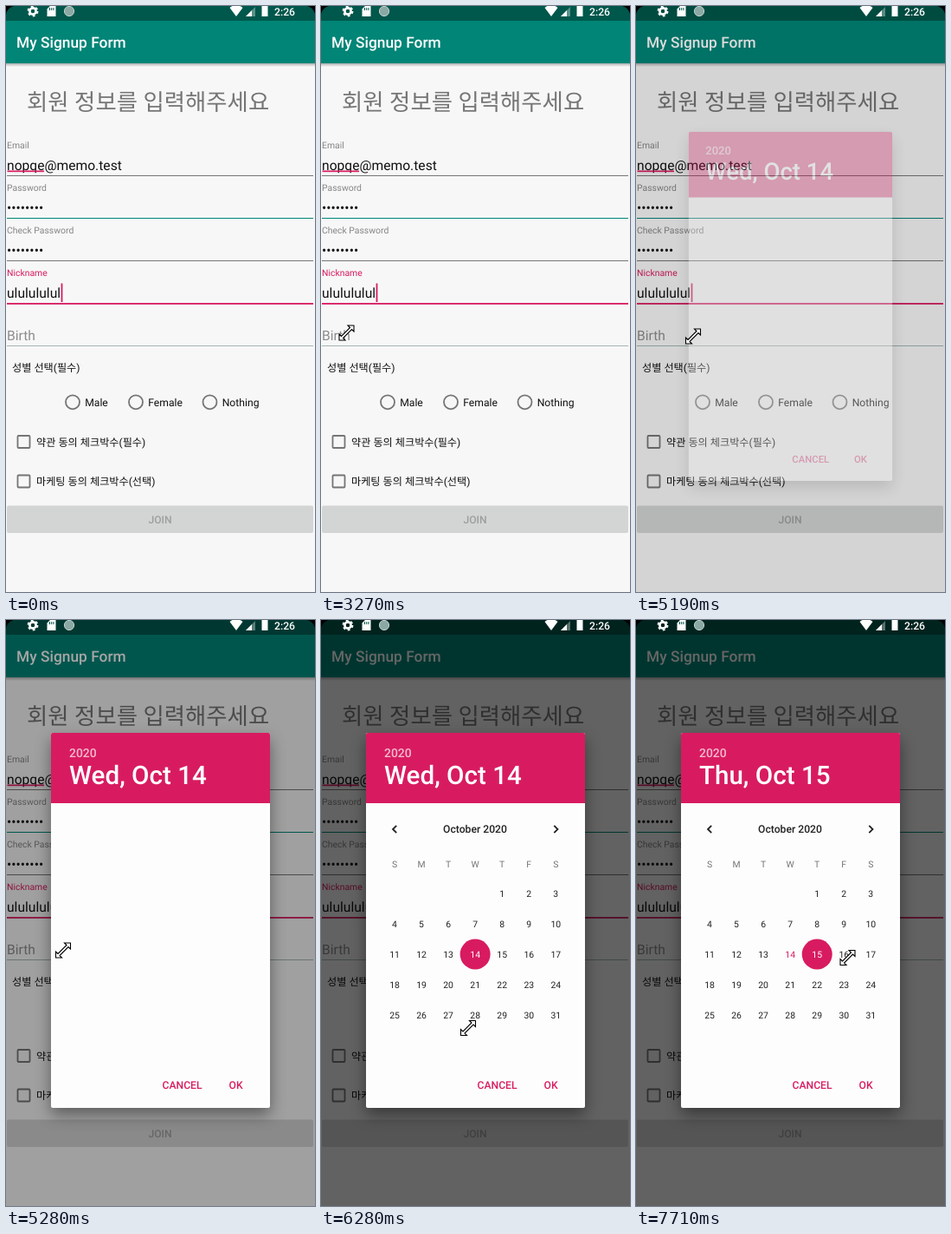
Animation, 357 px wide and 675 px high, one loop 8000 ms. Source, as an HTML page:

```html
<!DOCTYPE html>
<html lang="ko">
<head>
<meta charset="utf-8">
<title>Sign-up form</title>
<style>
  html, body { margin: 0; width: 100%; height: 100%; overflow: hidden; background: #f7f7f7; }
  svg { display: block; width: 357px; height: 675px; }
  text {
    font-family: Roboto, "Noto Sans CJK KR", "Noto Sans CJK", sans-serif;
    font-size: 12.16px; text-rendering: geometricPrecision; white-space: pre;
  }
  .medium { font-weight: 500; }
  .label { font-size: 10.42px; }
  .field { font-size: 15.63px; }
  .middle { text-anchor: middle; }
  #dialog { transform-origin: 178px 346px; }
  #sheet { filter: drop-shadow(0 8px 9px rgba(0, 0, 0, .42)); }
</style>
</head>
<body>
<svg viewBox="0 0 357 675">
  <defs>
    <linearGradient id="barShadow" x2="0" y2="1">
      <stop stop-color="#000" stop-opacity=".3"/>
      <stop offset="1" stop-color="#000" stop-opacity="0"/>
    </linearGradient>
  </defs>
  <rect width="357" height="675" fill="#f7f7f7"/>
  <g id="form"></g>
  <rect id="caret" x="63.6" y="319.5" width="1.8" height="21.5" fill="#d81b60"/>
  <rect id="dim" width="357" height="675"/>
  <g id="status" fill="#fff">
    <path d="M0 0H9Q2 2 0 9ZM357 0H348Q355 2 357 9Z" fill="#000"/>
    <circle cx="31" cy="6" r="3.6" fill="none" stroke="#fff" stroke-width="2.6"/>
    <circle cx="31" cy="6" r="5.4" fill="none" stroke="#fff" stroke-width="2" stroke-dasharray="2.8 2.85"/>
    <path d="M51 0H57.5V12H47.5V3.5Z"/>
    <path d="M50.5 2V5M52.7 2V5M54.9 2V5" stroke="#00574b"/>
    <circle cx="73" cy="6" r="5.6" fill="#8ba9a4" stroke="#c3d2cf"/>
    <path d="M258.5 2Q266 -4 273.5 2L266 12Z"/>
    <path d="M277 12L288 1V12Z" opacity=".35"/>
    <path d="M277 12L284 5V12Z"/>
    <path d="M295.5 0H302.5V12H295.5Z"/>
    <text class="medium" x="310" y="11">2:26</text>
  </g>
  <g id="dialog">
    <g id="sheet">
      <rect x="52" y="130" width="253" height="432" rx="2" fill="#fdfdfd"/>
      <path d="M52 211V132q0-2 2-2H303q2 0 2 2V211Z" fill="#d81b60"/>
    </g>
    <text class="medium" x="73" y="157.5" fill="#fff" fill-opacity=".7" style="font-size:13.9px">2020</text>
    <text class="medium" id="date" x="73" y="188.5" fill="#fff" style="font-size:29.6px"></text>
    <text class="medium" x="180.5" y="540" fill="#d81b60">CANCEL</text>
    <text class="medium" x="257.5" y="540" fill="#d81b60">OK</text>
    <g id="calendar"></g>
  </g>
  <circle id="click" cx="29" cy="376" r="14.5" fill="#ff0" opacity=".4"/>
  <path id="pointer" fill="#fff" stroke="#000" stroke-width="1.1"
    d="M1.5-8.5H8.5V-1.5L6-4L-4 6L-1.5 8.5H-8.5V1.5L-6 4L4-6Z"/>
</svg>
<script>
const LOOP = 8000;
const PINK = '#d81b60', TEAL = '#008577', GREY = '#757575';
const $ = id => document.getElementById(id);
const clamp = v => Math.max(0, Math.min(1, v));
const show = (id, on) => $(id).setAttribute('visibility', on ? 'visible' : 'hidden');

const text = (x, y, str, fill = '#111', cls = '', style = '') =>
  `<text x="${x}" y="${y}" fill="${fill}" class="${cls}" style="${style}">${str}</text>`;
const rect = (x, y, w, h, fill) =>
  `<rect x="${x}" y="${y}" width="${w}" height="${h}" fill="${fill}"/>`;

function buildForm() {
  const fields = [
    ['Email', 'nopqe@memo.test', GREY],
    ['Password', '••••••••', TEAL],
    ['Check Password', '••••••••', GREY],
    ['Nickname', 'ululululul', PINK]
  ];
  const radios = [['Male', 77], ['Female', 150], ['Nothing', 235.5]];
  const checks = [['약관 동의 체크박수(필수)', 502], ['마케팅 동의 체크박수(선택)', 547.5]];

  let out = rect(0, 0, 357, 17, '#00574b') + rect(0, 17, 357, 49, TEAL)
    + rect(0, 66, 357, 4, 'url(#barShadow)')
    + text(12, 48, 'My Signup Form', '#fff', 'medium', 'font-size:17.36px')
    + text(24, 120, '회원 정보를 입력해주세요', GREY, '', 'font-size:26.4px');

  fields.forEach(([label, value, color], i) => {
    const y = 49 * i, active = color === PINK;
    out += text(1, 163.7 + y, label, active ? PINK : '#858585', 'label')
      + text(1, 189 + y, value, '#111', 'field')
      + rect(1, 195 + y, 354, active ? 1.8 : 1, color);
  });
  out += rect(1.5, 189.5, 42.5, 1.7, PINK)
    + text(1, 384.7, 'Birth', '#8c8c8c', 'field')
    + rect(1, 391, 354, 1, '#a3b5b2')
    + text(7, 421, '성별 선택(필수)');

  for (const [name, x] of radios)
    out += `<circle cx="${x}" cy="456.3" r="8" fill="none" stroke="${GREY}" stroke-width="1.8"/>`
      + text(x + 14.2, 460.8, name);
  for (const [name, y] of checks)
    out += `<rect x="13.5" y="${y - 7}" width="14" height="14" rx="1" fill="none" stroke="${GREY}" stroke-width="1.8"/>`
      + text(35, y + 4.6, name);

  out += `<rect x="1" y="575.5" width="354" height="31.5" rx="2" fill="#d3d5d4"/>`
    + text(178, 596, 'JOIN', '#9d9f9e', 'medium middle');
  $('form').innerHTML = out;
}

function buildCalendar(selected) {
  const colX = i => 85 + 31.05 * i;
  let out = text(178, 245.4, 'October 2020', '#212121', 'medium middle')
    + '<path d="M87.2 236.8L83 241l4.2 4.2M269.3 236.8l4.2 4.2l-4.2 4.2" fill="none" stroke="#212121" stroke-width="1.8"/>';
  [...'SMTWTFS'].forEach((d, i) => out += text(colX(i), 285, d, GREY, 'label middle'));
  for (let day = 1; day <= 31; day++) {
    const cell = day + 3, x = colX(cell % 7), y = 315 + 35 * Math.floor(cell / 7);
    const on = day === selected;
    if (on) out += `<circle cx="${x}" cy="${y}" r="17.5" fill="${PINK}"/>`;
    out += text(x, y + 3.6, day, on ? '#fff' : day === 14 ? PINK : '#212121', 'label middle');
  }
  $('calendar').innerHTML = out;
  $('date').textContent = selected === 14 ? 'Wed, Oct 14' : 'Thu, Oct 15';
}

// Pointer moves: start, end, number of jumps, then points on the path.
const moves = [
  [1040, 1590, 7, [348, 612], [230, 520], [120, 430], [74, 403]],
  [1670, 1830, 2, [64, 396], [50, 387]],
  [1920, 1980, 1, [40, 385], [33, 383]],
  [2460, 2610, 1, [29.5, 378], [29.5, 376.5]],
  [4230, 4250, 1, [26, 395], [25, 421]],
  [4390, 4870, 7, [40, 450], [114, 475], [95, 420], [66, 380.5]],
  [5820, 6280, 6, [55, 390], [41, 430], [90, 487], [170, 470]],
  [6360, 6590, 3, [185, 440], [201, 361]],
  [6670, 6820, 2, [205, 365], [220, 390]],
  [7290, 7530, 3, [224, 394], [237, 384]],
  [7710, 7711, 1, [244.5, 389], [244.5, 389]]
];

function pointerAt(t) {
  const move = moves.filter(m => m[0] <= t).pop();
  if (!move) return null;
  const [start, end, jumps, ...path] = move;
  const u = clamp(Math.floor((t - start) / (end - start) * jumps + .01) / jumps);
  const pos = u * (path.length - 1);
  const i = Math.min(Math.floor(pos), path.length - 2);
  return path[i].map((v, k) => v + (path[i + 1][k] - v) * (pos - i));
}

const caretOff = [[270, 800], [1330, 1830], [2300, 2850]];
const OPEN = 5190, PICK = 7100;
let selected = 0;

function draw(t) {
  show('caret', !caretOff.some(([a, b]) => t >= a && t < b));
  show('click', t >= 3160 && t < 3270);

  const open = t >= OPEN;
  const step = OPEN + Math.min(4, Math.floor((t - OPEN) / 82 + .01)) * 82;
  const fade = open ? Math.sin(clamp((step - 5140) / 330) * Math.PI / 2) : 0;
  $('dim').setAttribute('opacity', .6 * fade);
  $('dialog').style.opacity = open ? clamp((step - 5160) / 100) : 0;
  $('dialog').style.transform = `scale(${.9 + .1 * clamp((step - 5160) / 100)})`;
  show('calendar', t >= 5370);

  const day = t < PICK ? 14 : 15;
  if (day !== selected) buildCalendar(selected = day);

  const p = pointerAt(t);
  show('pointer', p);
  if (p) $('pointer').setAttribute('transform', `translate(${p})`);
}

buildForm();
const begin = performance.now();
function tick() {
  draw((performance.now() - begin) % LOOP);
  requestAnimationFrame(tick);
}
tick();
</script>
</body>
</html>
```
